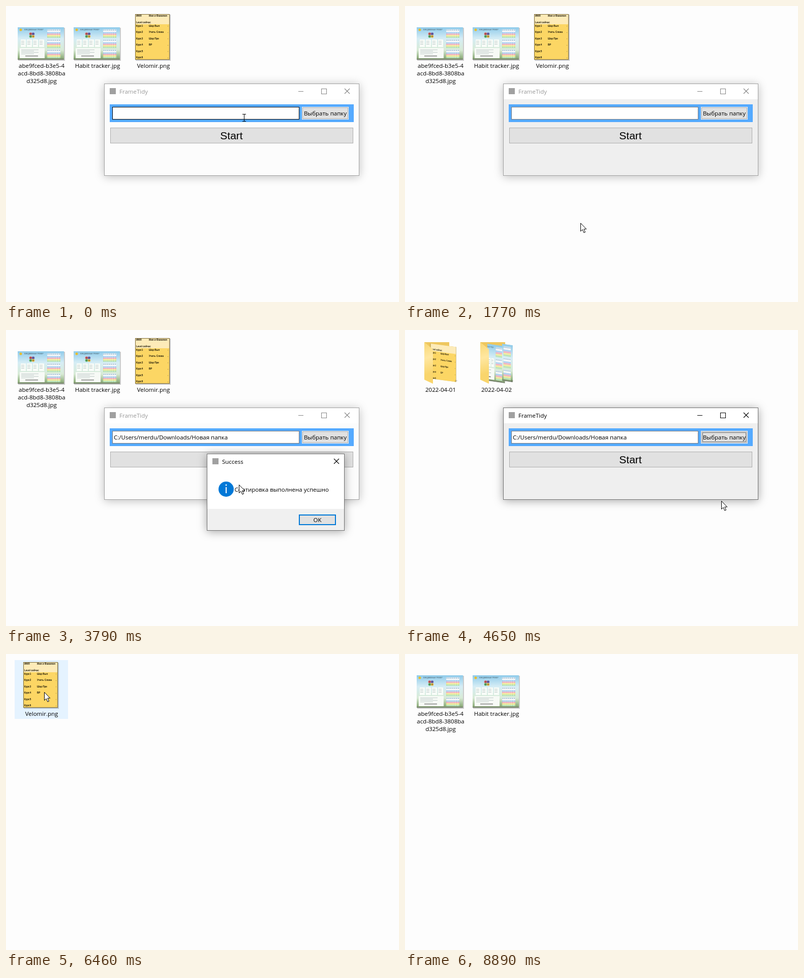
An HTML page with a canvas for the animation above (9.61 s loop, 773 by 584 pixels).

```html
<!DOCTYPE html>
<html lang="ru">
<head>
<meta charset="utf-8">
<title>FrameTidy</title>
<style>
html, body { margin: 0; width: 100%; height: 100%; overflow: hidden; background: #fdfdfd; }
canvas { display: block; }
</style>
</head>
<body>
<canvas id="stage" width="773" height="584"></canvas>
<script>
const stage = document.getElementById('stage');
const layer = stage.cloneNode();
let ctx = stage.getContext('2d');
const LOOP = 9610;
const UI = '"Open Sans", "Noto Sans", sans-serif';
const ARIAL = '"Liberation Sans", sans-serif';
const BLUE = '#0078d7';

// Moments when something switches, in ms
const ACTIVATE = 700, DIALOG_OPEN = 1070, DIALOG_CLOSE = 1620, PATH_SET = 2010,
  MESSAGE_OPEN = 3490, MESSAGE_CLOSE = 4300, SORTED = 4600, WINDOW_CLOSE = 5510,
  OPEN_FIRST = 6340, BACK = 7490, OPEN_SECOND = 8230, POINTER_GONE = 8890;

// Pointer path: time, x, y
const path = [
  [0, 468, 220], [50, 468, 220], [560, 620, 211], [1040, 622, 212], [1130, 577, 234],
  [1480, 348, 424], [1770, 345, 428], [2010, 345, 428], [2660, 461, 241], [2930, 429, 253],
  [3040, 429, 253], [3090, 434, 258], [3490, 434, 258], [3790, 458, 305], [4150, 610, 373],
  [4490, 612, 373], [5100, 669, 166], [5490, 671, 168], [5560, 447, 92], [6060, 75, 75],
  [7490, 75, 75], [7650, 96, 126], [7960, 198, 73], [8230, 198, 73], [8840, 689, 439]
];

const clamp = v => Math.max(0, Math.min(1, v));
const ramp = (t, from, to) => clamp((t - from) / (to - from));
const between = (t, from, to) => t >= from && t < to;
const inside = (p, x, y, w, h) => p.x >= x && p.x < x + w && p.y >= y && p.y < y + h;

function pointerAt(t) {
  const next = path.findIndex(k => k[0] > t);
  if (next < 0) return { x: 689, y: 439 };
  const [a, b] = [path[next - 1], path[next]];
  const u = ramp(t, a[0], b[0]), k = u * u * (3 - 2 * u);
  return { x: a[1] + (b[1] - a[1]) * k, y: a[2] + (b[2] - a[2]) * k };
}

function rect(x, y, w, h, fill, border, line = 1) {
  if (fill) { ctx.fillStyle = fill; ctx.fillRect(x, y, w, h); }
  if (border) {
    ctx.strokeStyle = border;
    ctx.lineWidth = line;
    ctx.strokeRect(x + line / 2, y + line / 2, w - line, h - line);
  }
}

function text(s, x, y, color = '#000', align = 'left', size = 11.5, family = UI) {
  ctx.font = size + 'px ' + family;
  ctx.textAlign = align;
  ctx.fillStyle = color;
  ctx.fillText(s, x, y);
}

function shape(points, fill, stroke) {
  ctx.beginPath();
  points.forEach(([x, y]) => ctx.lineTo(x, y));
  ctx.closePath();
  if (fill) { ctx.fillStyle = fill; ctx.fill(); }
  if (stroke) { ctx.strokeStyle = stroke; ctx.lineWidth = 1; ctx.stroke(); }
}

function disc(x, y, r, fill) {
  ctx.fillStyle = fill;
  ctx.beginPath();
  ctx.arc(x, y, r, 0, 7);
  ctx.fill();
}

function group(draw, ...matrix) {
  ctx.save();
  ctx.transform(...matrix);
  draw();
  ctx.restore();
}

function crop(x, y, w, h) {
  ctx.beginPath();
  ctx.rect(x, y, w, h);
  ctx.clip();
}

// Draws on a separate layer, then blends it in as a whole
function fade(alpha, draw) {
  if (!alpha) return;
  const base = ctx;
  ctx = layer.getContext('2d');
  ctx.clearRect(0, 0, 773, 584);
  draw();
  ctx = base;
  ctx.globalAlpha = alpha;
  ctx.drawImage(layer, 0, 0);
  ctx.globalAlpha = 1;
}

function cross(x, y, color) {
  ctx.strokeStyle = color;
  ctx.lineWidth = 1.1;
  ctx.beginPath();
  ctx.moveTo(x, y); ctx.lineTo(x + 10, y + 10);
  ctx.moveTo(x + 10, y); ctx.lineTo(x, y + 10);
  ctx.stroke();
}

function panel(x, y, w, h, fill, border, strength) {
  ctx.save();
  ctx.shadowColor = `rgba(0,0,0,${strength})`;
  ctx.shadowBlur = 17;
  ctx.shadowOffsetY = 2;
  rect(x, y, w, h, fill);
  ctx.restore();
  rect(x, y, w, h, null, border);
}

// 91 x 64 picture of a habit table
function tracker() {
  rect(1, 1, 92, 65, 'rgba(0,0,0,.2)');
  const sky = ctx.createLinearGradient(0, 0, 0, 64);
  [[0, '#8fcbea'], [.35, '#d6edf5'], [.7, '#d8ebd6'], [.95, '#8fae7c'], [1, '#6f7768']]
    .forEach(stop => sky.addColorStop(...stop));
  rect(0, 0, 91, 64, sky);
  disc(6, 5, 2.5, '#e8bd2c');
  text('ЕЖЕДНЕВНЫЙ ТРЕКЕР', 13, 6, '#3c5560', 'left', 3.3, ARIAL);
  ['#d65a5a', '#6a62b0', '#5bb56a', '#e4b440'].forEach((c, i) => {
    const x = 25.5 + i % 2 * 5, y = 13 + (i >> 1) * 5;
    disc(x, y, 2.8, c);
    rect(x - .8, y - .8, 1.6, 1.6, '#444');
  });
  for (let i = 0; i < 4; i++) {
    rect(6 + i * 12, 24, 10, 15, '#f8fcf8');
    for (let j = 0; j < 3; j++) rect(7 + i * 12, 27 + j * 3, 6, .6, '#9aa');
  }
  rect(4, 41, 49, 20, '#f7faf6');
  for (let j = 0; j < 4; j++) rect(7, 44 + j * 2.7, 34 - j % 2 * 9, .6, '#9aa');
  rect(15, 56, 25, 1.2, '#666');
  const rows = ['#d8e7f4', '#f4f7f9', '#a9cdf2', '#f1adba', '#f3e993', '#b4e2b0'];
  for (let b = 0; b < 3; b++) {
    rows.forEach((c, i) => rect(58, 4 + b * 20 + i * 2.8, 26, 2.8, c));
    for (let i = 1; i < 7; i++) rect(58 + i * 3.7, 4 + b * 20, .5, 17, 'rgba(255,255,255,.8)');
    for (let i = 0; i < 7; i++) rect(59 + i * 3.7, 5 + b * 20, 1.5, 1, '#7890a0');
  }
}

// 68 x 90 picture of a yellow list
function note() {
  rect(1, 1, 69, 91, 'rgba(0,0,0,.2)');
  rect(0, 0, 68, 90, '#fcd664');
  rect(1, 1, 66, 19, '#fdebb8');
  rect(0, 0, 68, 90, null, '#7d6a35');
  const tiny = (s, x, y) => text(s, x, y, '#1c1808', 'left', 'bold 4.6', ARIAL);
  tiny('ИМЯ', 2, 5);
  tiny('Имя и Фамилия', 27, 5);
  tiny('Level сейчас', 2, 18);
  ['Шар Вып', 'Учить Слова', 'Шар Пре', 'БР', '', ''].forEach((s, i) => {
    const y = 24.5 + i * 12.5;
    tiny('Курс' + (i + 1), 2, y);
    tiny(s, 27, y);
    rect(64, y - 1, 1, .7, '#6b5a20');
  });
}

function folder(pages) {
  shape([[0, 0], [49, 0], [49, 14], [14, 14], [14, 75], [0, 72]], '#eec75e');
  pages();
  shape([[61, 74], [66, 76], [60, 79]], 'rgba(0,0,0,.15)');
  const flap = ctx.createLinearGradient(0, 0, 17, 60);
  flap.addColorStop(0, '#f8d775');
  flap.addColorStop(.5, '#ffe7a0');
  flap.addColorStop(1, '#f9d56c');
  shape([[0, 0], [17, 14], [17, 82], [0, 74]], flap);
}

function notePage() {
  group(() => { crop(0, 6, 67, 69); note(); }, .76, .1, 0, 1, 11.5, -3.3);
}

function trackerPage(x, from) {
  group(() => { crop(from, 0, 91 - from, 64); tracker(); },
    .55, .08, 0, 1.14, x - from * .55, 3 - from * .08);
}

const items = {
  code: { at: [23, 42], draw: tracker, label: ['abe9fced-b3e5-4', 'acd-8bd8-3808ba', 'd325d8.jpg'] },
  habit: { at: [23, 42], draw: tracker, label: ['Habit tracker.jpg'] },
  list: { at: [34, 16], draw: note, label: ['Velomir.png'] },
  first: { at: [38, 24], draw: () => folder(notePage), label: ['2022-04-01'] },
  second: {
    at: [38, 24], label: ['2022-04-02'],
    draw: () => folder(() => { trackerPage(14, 28); trackerPage(43, 53); })
  }
};

function visibleItems(t) {
  if (t < SORTED) return [items.code, items.habit, items.list];
  if (between(t, OPEN_FIRST, BACK)) return [items.list];
  if (t >= OPEN_SECOND) return [items.code, items.habit];
  return [items.first, items.second];
}

function desktop(t, p) {
  visibleItems(t).forEach((item, i) => {
    const x = i * 110;
    const selected = i === 0 ? between(t, 6090, OPEN_FIRST) : between(t, 7930, OPEN_SECOND);
    const hovered = t < POINTER_GONE && inside(p, 17 + x, 12, 105, 116);
    if (selected) rect(17 + x, 12, 105, 116, '#cce8ff', '#99d1ff');
    else if (hovered) rect(17 + x, 12, 105, 116, '#e5f3ff');
    group(item.draw, 1, 0, 0, 1, item.at[0] + x, item.at[1]);
    item.label.forEach((s, n) => text(s, 70 + x, 122 + n * 15, '#000', 'center'));
  });
}

function pushButton(p, x, y, w, h, enabled) {
  const hot = enabled && inside(p, x, y, w, h);
  rect(x, y, w, h, hot ? '#e5f1fb' : '#e1e1e1', hot ? BLUE : '#adadad');
}

function appWindow(t, p) {
  const active = between(t, ACTIVATE, DIALOG_OPEN) || between(t, PATH_SET, MESSAGE_OPEN) || t >= MESSAGE_CLOSE;
  const pale = t < ACTIVATE || between(t, MESSAGE_OPEN, MESSAGE_CLOSE);
  const enabled = active || t < ACTIVATE;
  const ink = active ? '#000' : '#858585';
  panel(193, 153, 502, 182, pale ? '#fcfcfc' : '#efefef', active ? '#707070' : '#a0a0a0', active ? .35 : .25);
  rect(194, 154, 500, 30, '#fff');
  rect(204, 162, 12, 12, '#a0a0a0');
  text('FrameTidy', 223, 173, active ? '#000' : '#999');
  rect(575, 168, 10, 1, ink);
  rect(620, 163, 11, 11, null, ink);
  const closing = enabled && inside(p, 648, 154, 46, 29);
  if (closing) rect(648, 154, 46, 29, '#e81123');
  cross(666, 163, closing ? '#fff' : ink);

  rect(204, 194, 480, 35, '#55aaff');
  rect(209, 199, 368, 25, '#fff', enabled && inside(p, 209, 199, 368, 25) ? '#000' : '#7a7a7a');
  if (t >= PATH_SET) text('C:/Users/merdu/Downloads/Новая папка', 212, 216);
  rect(582, 199, 92, 25, '#f4f4f4');
  pushButton(p, 583, 200, 90, 23, enabled);
  if (active && t >= PATH_SET) {
    ctx.setLineDash([1, 1]);
    rect(585, 202, 86, 19, null, '#000');
    ctx.setLineDash([]);
  }
  text('Выбрать папку', 628, 216, '#000', 'center');
  pushButton(p, 205, 240, 478, 31, enabled);
  text('Start', 443.5, 263, '#000', 'center', 21, ARIAL);
}

function folderDialog() {
  panel(-300, -200, 799, 638, '#fff', '#8a8a8a', .35);
  disc(476, 8, 7.5, '#2f83c5');
  text('?', 476, 12.5, '#fff', 'center', 'bold 12');
  const gray = '#4c5560';
  text('Дата изменения', 10, 40, gray);
  text('Тип', 149, 40, gray);
  text('Размер', 264, 40, gray);
  text('Нет элементов, удовлетворяющих условиям поиска.', 260, 74, gray, 'right');
  rect(-200, 374, 682, 22, '#fff', BLUE);
  rect(277, 402, 107, 23, '#f4f4f4', BLUE, 2);
  text('Выбор папки', 330, 417, '#222', 'center');
  rect(398, 402, 83, 23, '#f4f4f4', '#adadad');
  text('Отмена', 439, 417, '#222', 'center');
  for (let i = 0; i < 3; i++) rect(494 - i * 3, 434, 1.5, 1.5, '#aaa');
}

function messageBox(p) {
  panel(395, 244, 271, 152, '#fff', '#707070', .35);
  rect(396, 353, 269, 42, '#f0f0f0');
  rect(406, 253, 12, 12, '#a0a0a0');
  text('Success', 425, 264);
  cross(645, 254, '#000');
  disc(433, 314, 15, BLUE);
  disc(433, 306, 1.4, '#fff');
  rect(432, 310, 2, 12, '#fff');
  text('Сортировка выполнена успешно', 635, 319, '#000', 'right');
  rect(576, 364, 73, 21, inside(p, 576, 364, 73, 21) ? '#e5f1fb' : '#e1e1e1', BLUE, 2);
  text('OK', 612.5, 379, '#000', 'center');
}

function pointer(t, p) {
  if (t >= POINTER_GONE) return;
  const x = Math.round(p.x), y = Math.round(p.y);
  if (t < DIALOG_OPEN && inside(p, 209, 199, 368, 25)) {
    rect(x, y - 7, 1, 15, '#000');
    for (const dy of [-7, 7]) rect(x - 3, y + dy, 7, 1, '#000');
    return;
  }
  group(() => shape([[0, 0], [0, 16], [3.6, 12.6], [6.4, 18.8], [9, 17.6], [6.3, 11.6], [11.2, 11.6]], '#fff', '#000'),
    1, 0, 0, 1, x + .5, y + .5);
}

function frame() {
  const t = performance.now() % LOOP, p = pointerAt(t);
  rect(0, 0, 773, 584, '#fdfdfd');
  desktop(t, p);
  if (t < WINDOW_CLOSE) appWindow(t, p);

  // The dialog grows slightly while it fades in and shrinks on the way out
  const dialog = Math.min(ramp(t, DIALOG_OPEN, 1270), 1 - ramp(t, DIALOG_CLOSE, 1770));
  const scale = .982 + .06 * dialog;
  fade(dialog, () => group(folderDialog, scale, 0, 0, scale, 100 * (1 - scale), 150 * (1 - scale)));

  const message = Math.min(ramp(t, MESSAGE_OPEN, 3600), 1 - ramp(t, MESSAGE_CLOSE, 4430));
  fade(message, () => messageBox(p));
  pointer(t, p);
  requestAnimationFrame(frame);
}
frame();
</script>
</body>
</html>
```
